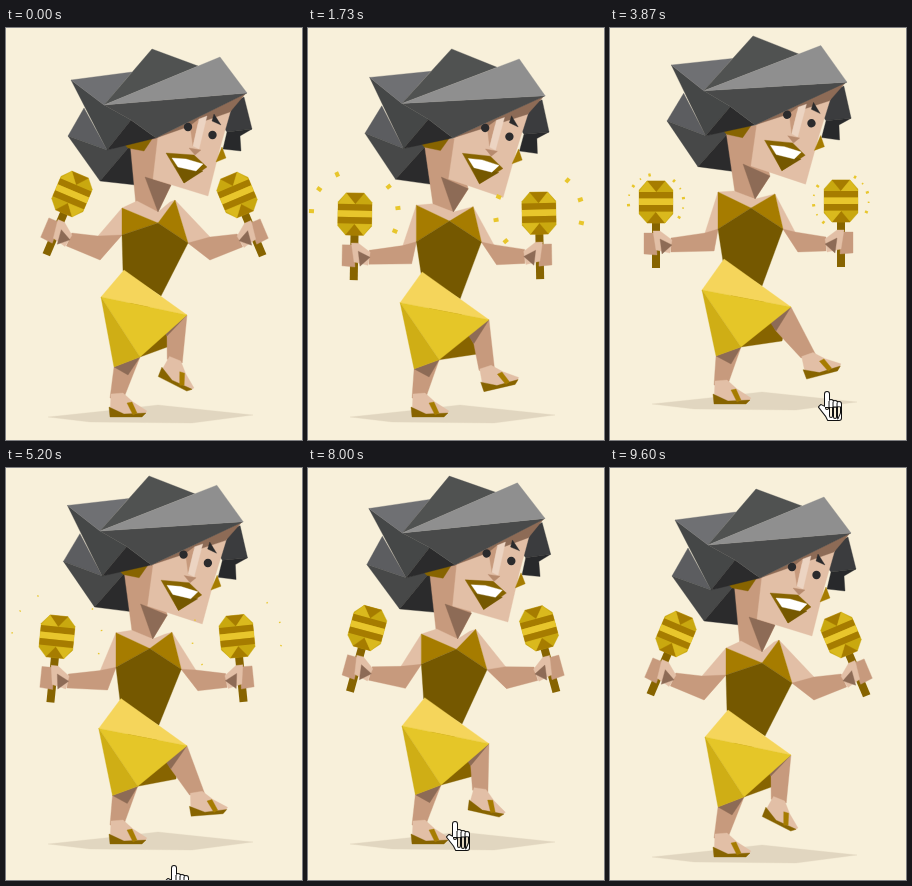
An HTML page with a canvas for the animation above (10000 ms loop, 296 by 412 pixels).

```html
<!DOCTYPE html>
<html lang="en">
<head>
<meta charset="utf-8">
<title>Maraca dancer</title>
<style>
  html, body { margin: 0; width: 100%; height: 100%; overflow: hidden; background: #f8f0da; }
  canvas { display: block; width: 296px; height: 412px; }
</style>
</head>
<body>
<canvas id="stage"></canvas>
<script>
const W = 296, H = 412, LOOP = 10000, STEP = 1000 / 15;
const BEATS = 6, DANCE = 37 * STEP, BEAT = DANCE / BEATS;
const DANCE_ENDS = [47, 92, 144].map(n => n * STEP);
const HOVERS = [[670, 1050], [3640, 6380], [7100, 8700]];

const PAPER = '#f8f0da', INK = '#2b2b2d';
const SKIN = '#e2bfa6', TAN = '#c79a7d', SHADE = '#8d6b56';
const GOLD = '#a67c00', DEEP = '#755800', SOLE = '#876400', SPARK = '#e8c62c';

const canvas = document.getElementById('stage');
const dpr = window.devicePixelRatio || 1;
canvas.width = W * dpr;
canvas.height = H * dpr;
const c = canvas.getContext('2d');
c.lineJoin = 'round';

const { sin, cos, PI, sqrt } = Math;
const lerp = (a, b, k) => a + (b - a) * k;
const clamp = u => Math.min(1, Math.max(0, u));
const ease = u => (u = clamp(u), u * u * (3 - 2 * u));
const points = s => s.split(' ').map(p => p.split(',').map(Number));
const mix = (a, b, k) => a.map((v, i) => lerp(v, b[i], k));
const morph = (from, to) => {
  const a = points(from), b = points(to);
  return k => a.map((p, i) => mix(p, b[i], k));
};

// Facets name their corners by letter: a is the first point of the mesh
const hair = points('65,52 126,44 98,77 146,21 192,38 214,29 241,65 125,92 101,122 150,110 78,80 ' +
  '62,108 94,153 128,113 130,157 206,84 238,69 246,101 234,108 235,123 217,121 221,104');
const hairBack = { kli: '#5c5d60', linm: '#474848', mno: '#2b2b2c', pqrv: '#3b3c3e', rstuv: '#28292b' };
const hairFront = { achi: '#454747', hij: '#2b2b2c', cgjh: '#494a4a', abc: '#6f7073', dec: '#505251', cfg: '#8f8f8f' };

const body = morph(
  '116,180 152,195 169,172 182,215 155,268 117,243 116,207 131,173 152,184 164,174 124,114 152,108 139,149 165,157 130,178',
  '108,177 141,193 165,179 173,214 152,271 113,246 108,214 124,176 145,184 157,181 116,116 147,110 133,149 160,161 125,178');
const bodyFacets = { klnio: TAN, ahijcb: SKIN, mni: SHADE, abcdbg: GOLD, gbdef: DEEP };

const lower = morph(
  '118,242 181,287 95,269 134,329 108,339 160,304 164,318 117,372 104,370 122,347',
  '114,244 181,292 92,275 131,332 106,341 176,310 172,326 117,372 104,370 121,349');
const legFacets = { edhi: TAN, edj: SHADE, afgd: SOLE };
const skirtFacets = { abc: '#f5d55b', cbd: '#e5c628', cde: '#cfae15' };

function polygon(fill, pts) {
  c.beginPath();
  pts.forEach(([x, y]) => c.lineTo(x, y));
  c.closePath();
  c.fillStyle = c.strokeStyle = fill;
  c.lineWidth = .35;
  c.fill();
  c.stroke();
}

const poly = (fill, s) => polygon(fill, points(s));

function facets(mesh, list) {
  for (const [corners, fill] of Object.entries(list))
    polygon(fill, [...corners].map(l => mesh[l.charCodeAt(0) - 97]));
}

function placed(x, y, angle, paint, flip = 1) {
  c.save();
  c.translate(x, y);
  c.rotate(angle);
  c.scale(flip, 1);
  paint();
  c.restore();
}

function dot(x, y, r, fill) {
  c.fillStyle = fill;
  c.beginPath();
  c.arc(x, y, r, 0, 7);
  c.fill();
}

function face() {
  poly(SKIN, '152,108 226,78 214,120 202,168 147,151');
  poly(SHADE, '150,110 240,65 224,84');
  poly(TAN, '184,98 193,91 187,118');
  poly('#ecd4c2', '193,91 201,88 193,121 187,118');
  poly('#b78b6e', '183,120 195,122 189,127');
  poly(SOLE, '160,125 188,127 201,139 178,155');
  poly(DEEP, '169,138 197,143 178,155');
  poly('#fff', '166,130 180,131 197,136 190,143 172,139');
  poly(INK, '206,93 208,86 215,97');
  poly(SOLE, '117,115 148,108 138,123 122,120');
  poly(GOLD, '216,119 220,130 210,134');
  dot(182, 99, 4.2, INK);
  dot(206.5, 107, 4.2, INK);
}

// Origin at the ankle
function foot() {
  poly(SKIN, '-6,-2 6,-3 16,6 30,15 27,19 -7,19');
  poly(SOLE, '-8,11 7,18 29,17 25,21 -7,21');
  poly(GOLD, '10,7 15,6 20,17 16,19');
}

// Origin in the middle of the bulb, the handle pointing down
function maraca() {
  c.fillStyle = SOLE;
  c.fillRect(-4, 18, 8, 48);
  for (const s of [-1, 1]) {
    polygon('#c9a80f', [[-17, 0], [-17, s * 12], [-9, s * 21], [9, s * 21], [17, s * 12], [17, 0]]);
    polygon(GOLD, [[-9, s * 21], [9, s * 21], [0, s * 10]]);
    polygon('#dab91d', [[s * 9, s * 21], [0, s * 10], [s * 17, s * 10]]);
  }
  ['#a67c00', SPARK, '#a67c00'].forEach((fill, i) => {
    c.fillStyle = fill;
    c.fillRect(-17, -10 + i * 6.5, 34, 6.5);
  });
}

function hand() {
  poly(TAN, '-12,31 0,31 1,53 -12,52');
  poly(SKIN, '-3,29 4,29 16,38 14,51 0,48');
  poly(SHADE, '4,37 16,43 6,52');
}

function burst(x, y, sides, phase) {
  const age = phase - 170;
  if (age <= 0 || age >= 145) return;
  const out = 1 - (1 - clamp(age / 110)) ** 3;
  for (const middle of sides)
    for (let i = -2; i <= 2; i++) {
      const a = (middle + i * lerp(30, 15, out)) * PI / 180;
      const size = sin(PI * age / 145) * (i % 2 ? 5 * (1 - out) + 1 : 5);
      if (i % 2 && out > .9) continue;
      placed(x + cos(a) * 45 * out, y + sin(a) * 45 * out, a, () => {
        c.fillStyle = SPARK;
        c.fillRect(-size / 2, -size * .4, size, size * .8);
      });
    }
}

// side is 1 for the arm on the left, -1 for its mirror image
function arm(side, shoulder, pit, bend, elbow, bulb, k) {
  const turn = side * lerp(.4, 0, k);
  const wrist = y => [
    bulb[0] + side * 15 * cos(turn) - y * sin(turn),
    bulb[1] + side * 15 * sin(turn) + y * cos(turn)
  ];
  polygon(SKIN, [shoulder, bend, elbow, pit]);
  polygon(TAN, [pit, elbow, wrist(50), wrist(36), bend]);
  return () => placed(bulb[0], bulb[1], turn, () => { maraca(); hand(); }, side);
}

function raisedLeg(k, kick, knee) {
  const ankle = [lerp(168, 198, k * kick), lerp(333, 342, k)];
  const angle = lerp(.47, -.26, k);
  const side = d => [ankle[0] + d * cos(angle / 2), ankle[1] + d * sin(angle / 2)];
  const inner = mix([161, 308], [166, 316], k);
  polygon(TAN, [knee, side(8.5), side(-7), inner, [160, 304]]);
  polygon(SHADE, [knee, [158, 304], inner]);
  placed(...ankle, angle, foot);
}

function dancer(t) {
  const end = DANCE_ENDS.find(e => t < e - 1 && t > e - DANCE);
  const time = end ? t - end + DANCE : 0;
  const phase = time % BEAT, turn = phase / BEAT;
  const kick = Math.floor(time / BEAT) % 3 === 2 ? .35 : 1;
  const k = sin(PI * turn);
  const torso = body(k), hips = lower(k);
  const head = paint => placed(150 - 4.6 * sqrt(sqrt(k)), 90, -.031 * sqrt(k) * cos(2 * PI * (turn - .1)), () => {
    c.translate(-150, -90);
    paint();
  });

  poly('#e1d6c0', '42,389 108,382 152,377 247,387 186,395 84,394');
  head(() => facets(hair, hairBack));
  facets(hips, legFacets);
  placed(111, 368, 0, foot);
  raisedLeg(k, kick, hips[1]);

  const left = mix([66, 166], [46, 187], k), right = mix([231, 167], [231, 186], k);
  const grips = [
    arm(1, torso[0], torso[6], mix([92, 208], [95, 218], k), mix([94, 232], [104, 236], k), left, k),
    arm(-1, torso[2], torso[3], mix([204, 209], [185, 217], k), mix([204, 232], [188, 237], k), right, k)
  ];
  facets(torso, bodyFacets);
  facets(hips, skirtFacets);
  head(() => { face(); facets(hair, hairFront); });
  grips.forEach(paint => paint());
  burst(...left, [215, -8], phase);
  burst(...right, [171, -18], phase);
}

// Time, then the place of the fingertip
const PATH = [[400, 304, 377], [670, 262, 374], [1250, 306, 377], [1260, 226, 416], [3600, 226, 416],
  [3867, 217, 364], [5200, 168, 398], [6130, 136, 404], [6390, 136, 404], [6560, 134, 416],
  [6740, 135, 416], [7460, 147, 354], [8470, 147, 354], [8850, 142, 416]];

function cursor(t) {
  const i = PATH.findIndex(p => p[0] > t);
  if (i < 1) return;
  const a = PATH[i - 1], b = PATH[i];
  const [, x, y] = mix(a, b, (t - a[0]) / (b[0] - a[0]));
  placed(x, y, 0, () => {
    const shapes = new Path2D();
    for (let f = 0; f < 4; f++) shapes.roundRect(f * 4 - 2, f && 7 + f, 4, 18, 2);
    shapes.addPath(new Path2D('M-2 15L-6 13L-8 15L-1 24L1 28H11L14 21V14Z'));
    c.strokeStyle = '#111';
    c.lineWidth = 2;
    c.stroke(shapes);
    c.fillStyle = '#fff';
    c.fill(shapes);
    c.fillStyle = '#111';
    for (let f = 1; f < 4; f++) c.fillRect(f * 4 - 2.5, 8 + f, 1, 7);
  });
}

function frame(now) {
  const t = Math.floor((now % LOOP) / STEP + .06) * STEP % LOOP;
  c.setTransform(dpr, 0, 0, dpr, 0, 0);
  c.fillStyle = PAPER;
  c.fillRect(0, 0, W, H);
  const lift = HOVERS.reduce((sum, [enter, leave]) =>
    sum + ease((t - enter) / 190) - ease((t - leave) / 220), 0);
  placed(0, -13 * lift, 0, () => dancer(t));
  cursor(t);
}

const begin = performance.now();
function tick() {
  frame(performance.now() - begin);
  requestAnimationFrame(tick);
}
tick();
</script>
</body>
</html>
```
